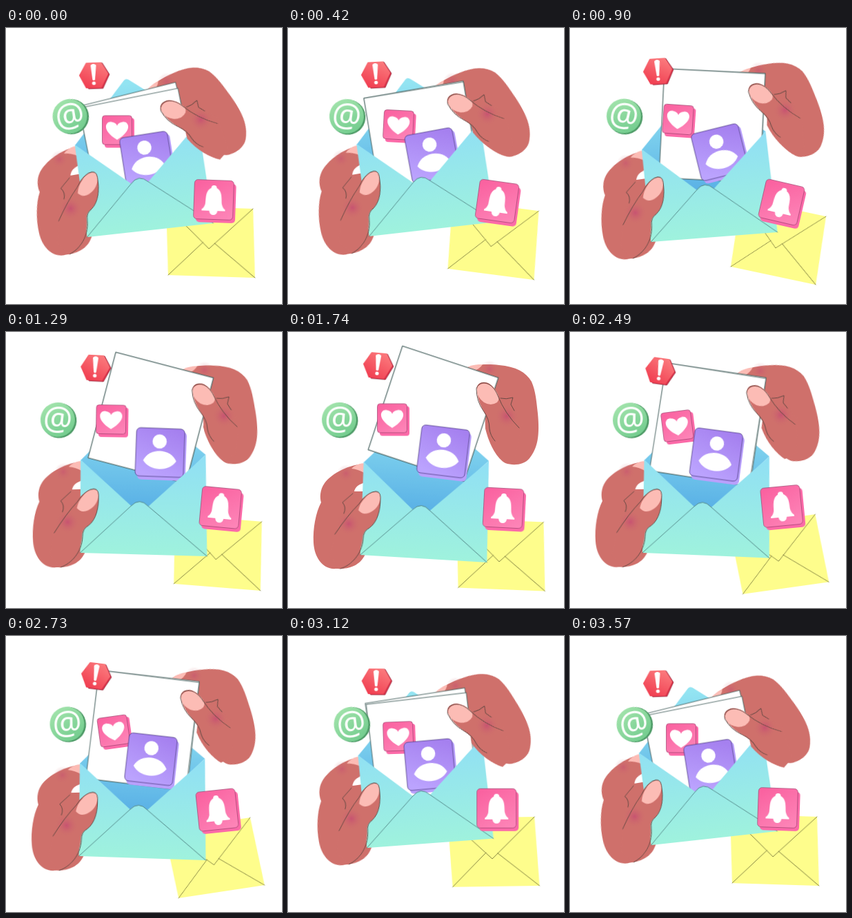
These frames come from a looping animation (400x400 px, 3.6 s). An HTML page without scripts:

```html
<!DOCTYPE html>
<html lang="en">
<head>
<meta charset="utf-8">
<title>Envelope</title>
<style>
html, body { margin: 0; width: 100%; height: 100%; overflow: hidden; background: #fff; }
svg { display: block; width: 100vw; height: 100vh; }

/* Each part lists six poses, a..f; one rule plays them all. */
.part {
  --rise: cubic-bezier(.4, .05, .75, .6);
  --settle: cubic-bezier(.3, .55, .6, 1);
  animation: poses 3.6s linear infinite;
}
.float { --rise: linear; --settle: cubic-bezier(.4, .4, .7, .9); }
@keyframes poses {
  0%, 100% { transform: var(--a); animation-timing-function: var(--rise); }
  11.67% { transform: var(--b); }
  25% { transform: var(--c); animation-timing-function: var(--settle); }
  48.33% { transform: var(--d); animation-timing-function: var(--rise); }
  61.67% { transform: var(--e); animation-timing-function: var(--rise); }
  75.83% { transform: var(--f); animation-timing-function: var(--settle); }
}
.letter {
  --a: translate(209px, 293px) rotate(-6.3deg);
  --b: translate(209px, 291.5px) rotate(-6.5deg);
  --c: translate(209px, 303px) rotate(-4.4deg);
  --d: translate(196.5px, 328.5px) rotate(3.4deg);
  --e: translate(194px, 332.5px) rotate(4.7deg);
  --f: translate(197.5px, 322px) rotate(1.9deg);
}
.paper {
  --a: translate(106px, 116px) rotate(-11.3deg);
  --b: translate(110px, 102px) rotate(-9.4deg);
  --c: translate(137px, 59px) rotate(2.9deg);
  --d: translate(166px, 20.5px) rotate(18.3deg);
  --e: translate(163px, 21.5px) rotate(18.4deg);
  --f: translate(135px, 49.5px) rotate(7deg);
}
.under {
  --a: translate(104px, 114px) rotate(-14deg);
  --b: translate(110px, 102px) rotate(-10deg);
  --c: translate(137px, 59px) rotate(2.6deg);
  --f: translate(135px, 49.5px) rotate(6.4deg);
}
.palm {
  --a: translate(249px, 110px) rotate(-30deg);
  --b: translate(253px, 110px) rotate(-27.9deg);
  --c: translate(281px, 97px) rotate(-15.5deg);
  --d: translate(290px, 90px) rotate(0deg);
  --e: translate(288px, 89px) rotate(.1deg);
  --f: translate(278px, 93px) rotate(-11.5deg);
}
.thumb {
  --a: translate(243px, 118.5px) rotate(-30deg);
  --b: translate(250px, 109px) rotate(-27.9deg);
  --c: translate(277px, 95.5px) rotate(-15.5deg);
  --f: translate(271px, 94px) rotate(-11.5deg);
}
.mail {
  --a: translate(296.5px, 310px) rotate(1.8deg);
  --b: translate(297.5px, 307px) rotate(7.4deg);
  --c: translate(302px, 309.5px) rotate(12deg);
  --d: translate(308.5px, 323px) rotate(2.3deg);
  --e: translate(307.5px, 324.5px) rotate(-5deg);
  --f: translate(302px, 321.5px) rotate(-8.6deg);
}
.at {
  --a: translate(92.5px, 128px) rotate(-12deg);
  --b: translate(85px, 128px) rotate(6deg);
  --c: translate(78px, 127.5px) rotate(10deg);
  --d: translate(74px, 127px) rotate(2deg);
  --e: translate(79.5px, 127.5px) rotate(4deg);
  --f: translate(88.5px, 127.5px) rotate(-3deg);
}
.alert {
  --a: translate(127px, 68px) rotate(-2deg);
  --b: translate(127px, 67px) rotate(-3deg);
  --c: translate(127px, 62px) rotate(-4deg);
  --d: translate(130px, 48px) rotate(5deg);
  --e: translate(131px, 48px) rotate(12deg);
  --f: translate(130px, 57px) rotate(7deg);
}
.heart {
  --a: translate(161px, 148.5px) rotate(0deg);
  --b: translate(160px, 141px) rotate(3deg);
  --c: translate(156.5px, 133px) rotate(4deg);
  --d: translate(151px, 125.5px) rotate(0deg);
  --e: translate(152.5px, 129px) rotate(-3deg);
  --f: translate(156px, 138px) rotate(-8deg);
}
.user {
  --a: translate(204px, 189px) rotate(-9deg);
  --b: translate(209px, 184.5px) rotate(-10.5deg);
  --c: translate(217px, 180px) rotate(-14deg);
  --d: translate(225px, 173px) rotate(7deg);
  --e: translate(221px, 173px) rotate(13deg);
  --f: translate(210px, 178.5px) rotate(6.5deg);
}
.bell {
  --a: translate(301px, 249px) rotate(2deg);
  --b: translate(303px, 251px) rotate(8deg);
  --c: translate(306.5px, 252.5px) rotate(13deg);
  --d: translate(312px, 255px) rotate(3deg);
  --e: translate(310px, 254.5px) rotate(-3deg);
  --f: translate(306px, 252px) rotate(-6deg);
}
.skin { fill: #cf706b; }
.nail { fill: #fcbcb5; }
.line { fill: none; stroke: #5e4640; stroke-width: .9; stroke-linecap: round; }
.sheet { fill: #fff; stroke: #45605d; stroke-width: .9; }
.white { fill: #fff; }
.pink { fill: url(#pink); stroke: #8c3560; stroke-width: .6; }
.pinkSide { fill: #fb6aa8; }
</style>
</head>
<body>
<svg viewBox="0 0 400 400">
  <defs>
    <linearGradient id="front" gradientUnits="userSpaceOnUse" x1="0" y1="-147" x2="0" y2="0">
      <stop stop-color="#90dff5"/><stop offset="1" stop-color="#9ff2dd"/>
    </linearGradient>
    <linearGradient id="inside" gradientUnits="userSpaceOnUse" x1="0" y1="-215" x2="0" y2="-72">
      <stop stop-color="#93e4f2"/><stop offset="1" stop-color="#5bb2e6"/>
    </linearGradient>
    <linearGradient id="pink" x1=".2" y1="0" x2=".8" y2="1">
      <stop stop-color="#fa62a0"/><stop offset="1" stop-color="#fd84b7"/>
    </linearGradient>
    <linearGradient id="violet" x1=".75" y1="0" x2=".35" y2="1">
      <stop stop-color="#a580ef"/><stop offset="1" stop-color="#bba3fe"/>
    </linearGradient>
    <linearGradient id="green" x1=".2" y1="0" x2=".8" y2="1">
      <stop stop-color="#a3e4ac"/><stop offset="1" stop-color="#71cb8d"/>
    </linearGradient>
    <linearGradient id="red" x1=".8" y1="0" x2=".2" y2="1">
      <stop stop-color="#fb7a7d"/><stop offset="1" stop-color="#f03d50"/>
    </linearGradient>
    <radialGradient id="blush">
      <stop stop-color="#c23f75" stop-opacity=".6"/><stop offset="1" stop-color="#cf706b" stop-opacity="0"/>
    </radialGradient>
  </defs>

  <!-- left palm, behind everything -->
  <g class="part letter"><g transform="rotate(-3.4) translate(-196.5 -328.5)">
    <path class="skin" d="M110 191C90 192 64 204 53 219C46 229 46 240 48 247C40 262 36 285 37 305C38 326 50 345 70 343C86 344 104 340 112 322V231H96Q98 221 113 218Z"/>
    <path class="nail" d="M92 198Q100 190 112 190V205Q102 199 92 198Z"/>
    <circle cx="84" cy="205" r="13" fill="url(#blush)" opacity=".6"/>
  </g></g>

  <g class="part float mail">
    <path fill="#fefd8c" d="M-66-50H60L66 50H-60Z"/>
    <path class="line" style="stroke:#77773a" d="M-66-50L-2 10 60-50M-60 50L-11 1M66 50L6 2"/>
  </g>

  <g class="part letter">
    <path fill="url(#inside)" d="M-95-134L-14-220Q-11-223-7-220L86-147 4-62H-20Z"/>
  </g>

  <!-- right palm and fingers -->
  <g class="part palm"><g transform="translate(-290 -90)">
    <path class="skin" d="M259 52C266 47 290 46 306 48C330 50 345 58 353 72C359 86 360 100 362 118C365 150 362 168 350 183C342 193 326 194 315 190C304 184 292 165 286 140L285 110 270 70Z"/>
    <path class="nail" d="M258 53Q266 46 282 47Q278 54 266 58Z"/>
    <circle cx="292" cy="54" r="13" fill="url(#blush)" opacity=".6"/>
  </g></g>

  <g class="part paper under"><rect class="sheet" width="146" height="158"/></g>
  <g class="part paper"><rect class="sheet" width="146" height="158"/></g>

  <g class="part float heart">
    <rect class="pinkSide" x="-18" y="-18" width="43" height="43" rx="4"/>
    <rect class="pink" x="-21.5" y="-21.5" width="43" height="42" rx="4"/>
    <path class="white" transform="scale(1.12)" d="M0 12C-22-1-14-13-7-11Q-1-10 0-6Q1-10 7-11C14-13 22-1 0 12Z"/>
  </g>

  <g class="part float user">
    <rect fill="#b9a0fc" x="-32" y="-31" width="70" height="71" rx="6"/>
    <rect fill="url(#violet)" stroke="#4c3a80" stroke-width=".8" x="-35" y="-35" width="70" height="70" rx="6"/>
    <circle class="white" cx="-1" cy="-16" r="10.3"/>
    <path class="white" d="M-24 12C-15-7 15-7 24 12C14 28-14 28-24 12Z"/>
  </g>

  <!-- envelope front with left thumb -->
  <g class="part letter">
    <path fill="url(#front)" d="M-92 0L-95-135-20-70Q-8-83 5-70L86-147 92 0Z"/>
    <path class="line" style="stroke:#4d7f80" d="M-92 0L-20-70Q-8-83 5-70L92 0"/>
    <g transform="rotate(-3.4) translate(-196.5 -328.5)">
      <path class="skin" d="M134 240C134 228 122 230 112 238C100 248 85 265 70 285L60 325 75 343C95 335 106 320 108 300C109 290 112 287 118 284C130 275 134 258 134 240Z"/>
      <circle cx="88" cy="278" r="17" fill="url(#blush)"/>
      <path class="nail" d="M134 237C131 229 119 232 112 240Q104 248 102 258Q108 266 118 262Q132 256 134 240Z"/>
      <path class="line" d="M68 293Q86 266 103 249Q112 236 122 232Q134 228 134 240C134 258 130 275 118 284Q109 288 109 300C107 322 92 338 76 343M94 234L79 247Q85 254 81 263"/>
    </g>
  </g>

  <!-- right thumb -->
  <g class="part palm thumb"><g transform="translate(-290 -90)">
    <path class="skin" d="M274 84C272 73 284 70 292 75C304 83 306 96 311 106L340 130 330 180 312 186C301 176 290 158 286 136L289 126C284 113 275 104 274 84Z"/>
    <circle cx="317" cy="122" r="17" fill="url(#blush)"/>
    <path class="nail" d="M275 79C283 70 297 76 303 88Q308 97 303 102Q294 108 284 102Q273 94 274 83Z"/>
    <path class="line" d="M335 139Q314 118 304 92C296 72 278 68 273 82Q273 100 283 114Q292 126 292 140Q293 150 300 158M308 96Q316 98 326 95L323 105 328 114"/>
  </g></g>

  <g class="part float bell">
    <rect class="pinkSide" x="-25" y="-24" width="57" height="57" rx="5"/>
    <rect class="pink" x="-28.5" y="-28.5" width="57" height="57" rx="5"/>
    <path class="white" d="M0-21a4 4 0 0 1 4 4C13-13 11 0 12 6Q13 11 17 14V16H-17V14Q-13 11-12 6C-11 0-13-13-4-17a4 4 0 0 1 4-4ZM-6 16H6Q5 22 0 22T-6 16Z"/>
  </g>

  <g class="part float at">
    <circle cx="2" cy="1" r="25.5" fill="#4d9a66"/>
    <circle r="25" fill="url(#green)"/>
    <text class="white" y="14.5" text-anchor="middle" font-family="'Noto Sans', 'Open Sans', sans-serif" font-size="47" font-weight="500">@</text>
  </g>

  <g class="part alert">
    <path fill="#d93349" stroke="#8f2438" stroke-width=".7" d="M-18 1L-8-17H13L23 0 13 20H-8Z"/>
    <path fill="url(#red)" stroke="url(#red)" stroke-width="2" stroke-linejoin="round" d="M-20 0L-10-17H11L20-1 10 18H-11Z"/>
    <path class="white" d="M-4-14Q0-18 4-14L1.8 7Q0 9-1.8 7Z"/>
    <circle class="white" cy="12" r="2.6"/>
  </g>
</svg>
</body>
</html>
```
